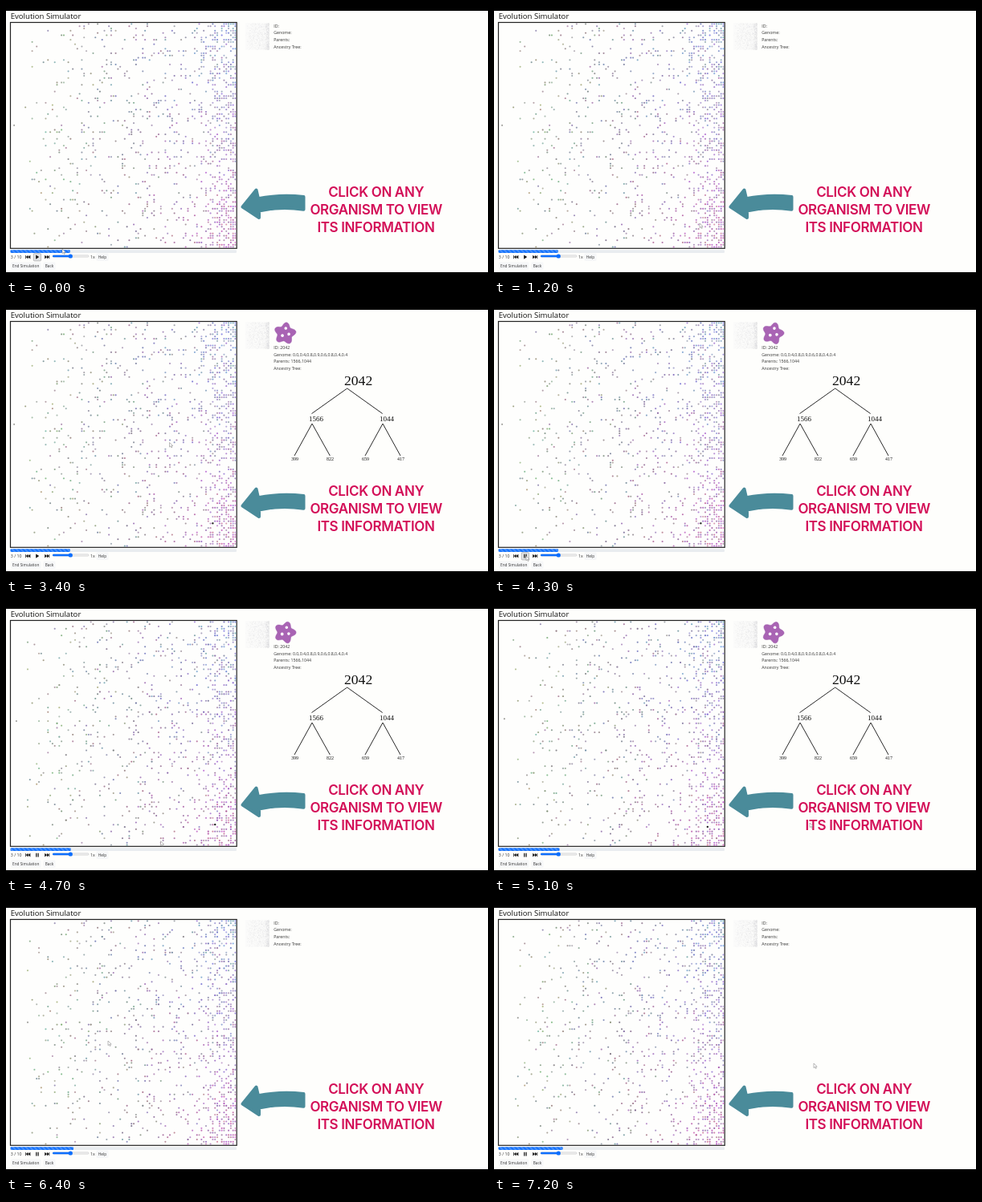
An HTML page with a canvas that plays this animation: 600x338 px, repeating every 7300 ms.

```html
<!DOCTYPE html>
<html lang="en">
<head>
<meta charset="utf-8">
<title>Evolution Simulator</title>
<style>
  html, body { margin: 0; width: 100%; height: 100%; overflow: hidden; background: #fefefc; }
  svg, canvas { position: absolute; left: 0; top: 0; width: 600px; height: 338px; }
  text { font-family: "Open Sans", "Noto Sans", sans-serif; font-size: 5.25px; fill: #333; }
  .title { font-size: 9.6px; font-weight: 500; fill: #111; }
  .btn { font-size: 4.75px; }
  .tree text { font-family: "Liberation Serif", serif; font-size: 6px; fill: #111; }
  .tree .root { font-size: 17.6px; }
  .tree .parent { font-size: 9px; }
  .call text { font-family: Inter, sans-serif; font-size: 17px; font-weight: 600; letter-spacing: -.35px; fill: #d30e57; text-anchor: middle; }
</style>
</head>
<body>
<svg viewBox="0 0 600 338">
  <defs>
    <pattern id="stripes" width="5.3" height="5.3" patternUnits="userSpaceOnUse">
      <rect width="5.3" height="5.3" fill="#0d6efd"/>
      <path d="M0 0H1.32L5.3 3.98V5.3H3.98L0 1.32ZM3.98 0H5.3V1.32ZM0 3.98V5.3H1.32Z" fill="#4a92fb"/>
    </pattern>
  </defs>
  <rect width="600" height="338" fill="#fefefc"/>
  <rect width="600" height="6" fill="#000"/>
  <rect y="332" width="600" height="6" fill="#000"/>
  <text class="title" x="5.7" y="16">Evolution Simulator</text>
  <rect x="5.5" y="20.5" width="281.7" height="281.8" fill="#fefefd" stroke="#222" stroke-width="1.2"/>

  <rect x="5.5" y="304.3" width="281.5" height="3.6" rx="1.2" fill="#e9ecef"/>
  <rect id="bar" x="5.5" y="304.3" width="74" height="3.6" rx="1" fill="url(#stripes)"/>
  <text x="5.8" y="314.9">3 / 10</text>
  <rect id="hover" x="34.3" y="308.7" width="9.2" height="9.2" rx="1" fill="#e3e4e5" stroke="#999" stroke-width=".6"/>
  <g fill="#111">
    <path d="M24.3 310.9h.7v4.4h-.7ZM27.6 310.8v4.6l-2.7-2.3ZM30.3 310.8v4.6l-2.7-2.3Z"/>
    <path id="play" d="M37.2 310.5v5.2l4-2.6Z"/>
    <path id="pause" d="M37.2 310.8h1.2v4.6h-1.2ZM39.5 310.8h1.2v4.6h-1.2Z"/>
    <path d="M48.2 310.8v4.6l2.7-2.3ZM50.9 310.8v4.6l2.7-2.3ZM53.5 310.9h.7v4.4h-.7Z"/>
  </g>
  <rect x="58" y="310.8" width="45" height="2.4" rx="1.2" fill="#efefef" stroke="#b8b8b8" stroke-width=".4"/>
  <rect x="58" y="310.8" width="22" height="2.4" rx="1.2" fill="#0d6efd"/>
  <circle cx="80.3" cy="312" r="2.6" fill="#0d6efd"/>
  <text x="105" y="314.8">1x</text>
  <g fill="#f6f7f8">
    <rect x="112.5" y="308.5" width="15" height="9.5" rx="1.3"/>
    <rect x="6" y="319.5" width="37.5" height="9.3" rx="1.3"/>
    <rect x="46.5" y="319.5" width="15" height="9.3" rx="1.3"/>
  </g>
  <text class="btn" x="114.8" y="314.9">Help</text>
  <text class="btn" x="8" y="325.8">End Simulation</text>
  <text class="btn" x="48.8" y="325.8">Back</text>

  <rect x="298" y="21" width="30" height="34" fill="#fbfbfa"/>
  <g id="labels">
    <text x="333.2" y="26.8">ID: <tspan class="val">2042</tspan></text>
    <text x="333.2" y="35.4">Genome: <tspan class="val">0.0,0.4,0.8,0.9,0.6,0.8,0.4,0.4</tspan></text>
    <text x="333.2" y="44">Parents: <tspan class="val">1566,1044</tspan></text>
    <text x="333.2" y="52.6">Ancestry Tree:</text>
  </g>
  <g id="details" class="tree">
    <g id="blob">
      <path fill="#a964b4" stroke="#9a58a8" stroke-width=".5"/>
      <g fill="#fff">
        <circle cx="2" cy="-6.3" r="1.8"/>
        <circle cx="-3.6" cy="2" r="1.9"/>
        <circle cx="4.6" cy="1.6" r="1.8"/>
      </g>
    </g>
    <path d="M380.5 135.5L424.7 104L468.7 135.5M359 188L381 148L403.3 188M447 188L469 148L491 188" fill="none" stroke="#111" stroke-width=".9"/>
    <text class="root" x="421" y="100.3">2042</text>
    <text class="parent" x="377" y="144.6">1566</text>
    <text class="parent" x="465" y="144.6">1044</text>
    <text x="355" y="194">399</text>
    <text x="399" y="194">822</text>
    <text x="443" y="194">659</text>
    <text x="487" y="194">417</text>
  </g>

  <path d="M294.5 250.500L311.500 229.500L314 240.300Q342 234.500 370.500 238V253.800Q342 249.500 315 255.500L315 264Z" fill="#4a8b9a" stroke="#4a8b9a" stroke-width="4" stroke-linejoin="round"/>
  <g class="call">
    <text x="460.7" y="237.8">CLICK ON ANY</text>
    <text x="460.7" y="259.8">ORGANISM TO VIEW</text>
    <text x="460.5" y="281.6">ITS INFORMATION</text>
  </g>
</svg>
<canvas id="field"></canvas>
<svg viewBox="0 0 600 338">
  <path id="cursor" d="M0 0V5.6L1.4 4.4L2.4 6.5L3.3 6.1L2.4 4.1H4.2Z" fill="#fff" stroke="#777" stroke-width=".5"/>
</svg>
<script>
const LOOP = 7300, PICK = 1300, START = 4200, CLEAR = 6100;
const CELLS = 100, SIZE = 2.81;
const $ = id => document.getElementById(id);
const show = (el, on) => { el.style.display = on ? "" : "none"; };
const mix = (a, b, k) => a + (b - a) * k;
const clamp = (v, lo, hi) => Math.min(hi, Math.max(lo, v));
const smooth = k => k * k * (3 - 2 * k);

let seed = 2042;
function rnd() {
  seed = (seed + 0x6D2B79F5) | 0;
  let h = Math.imul(seed ^ (seed >>> 15), 1 | seed);
  h = (h + Math.imul(h ^ (h >>> 7), 61 | h)) ^ h;
  return ((h ^ (h >>> 14)) >>> 0) / 4294967296;
}

// Chance that a cell is occupied; v runs from top to bottom
function density(u, v) {
  if (u < .06) return 0;
  if (u < .15) return mix(.01, .055, (u - .06) / .09);
  if (u < .78) return mix(.055, .075, (u - .15) / .63);
  const edge = .3 + .25 * Math.abs(2 * v - 1);
  return .075 + edge * Math.pow((u - .78) / .22, 1.5);
}

// Green on the left, blue at top right, pink at bottom right
function tint(u, v) {
  const right = [mix(122, 186, v), mix(142, 98, v), mix(200, 176, v)];
  const left = [144, 164, 132], mid = [130, 122, 146];
  const rgb = right.map((c, i) => {
    const base = u < .5 ? mix(left[i], mid[i], u * 2) : mix(mid[i], c, u * 2 - 1);
    return Math.round(base + (rnd() - .5) * 64);
  });
  return `rgba(${rgb},.8)`;
}

const dots = [{ x: 1, y: 45, amp: .8, drift: 2.6, p: 1, q: 2, w: 3, color: "#a0a09c" }];
for (let y = 0; y < CELLS; y++) {
  for (let x = 0; x < CELLS; x++) {
    const u = x / (CELLS - 1), v = y / (CELLS - 1);
    if (rnd() > density(u, v)) continue;
    dots.push({
      x, y, color: tint(u, v),
      amp: u > .85 ? .7 : 1.5,
      drift: u > .85 ? 0 : (rnd() - .35) * .9,
      p: rnd() * 6.28, q: rnd() * 6.28, w: 2 + rnd() * 3
    });
  }
}

const ratio = Math.max(2, window.devicePixelRatio || 1);
const canvas = $("field");
canvas.width = 600 * ratio;
canvas.height = 338 * ratio;
const ctx = canvas.getContext("2d");

function disc(x, y, r, color) {
  ctx.fillStyle = color;
  ctx.beginPath();
  ctx.arc(x, y, r, 0, 7);
  ctx.fill();
}

function place(d, s) {
  const sway = ph => d.amp * (Math.sin(ph + d.w * s) - Math.sin(ph));
  return [
    clamp(Math.round(d.x + sway(d.p) + d.drift * s), 0, CELLS - 1),
    clamp(Math.round(d.y + sway(d.q)), 0, CELLS - 1)
  ];
}

function drawField(s, picked) {
  ctx.setTransform(ratio, 0, 0, ratio, 0, 0);
  ctx.clearRect(0, 0, 600, 338);
  for (const d of dots) {
    const [x, y] = place(d, s);
    disc(7.3 + x * SIZE, 22.4 + y * SIZE, 1.05, d.color);
    ctx.fillStyle = "rgba(120,120,135,.15)";
    ctx.fillRect(297.5 + x * .3, 21.5 + y * .33, .5, .5);
  }
  if (picked) {
    const k = s / 1.6;
    disc(257.4 + Math.round(4.6 * k) * SIZE, 272.3 + Math.round(4.2 * k) * SIZE, 1.2, "#222");
  }
}

// Pointer stops: time, x, y
const stops = [
  [0, 70, 303], [300, 70, 303], [1150, 256, 271], [1450, 256, 271], [2100, 367, 30],
  [2900, 367, 30], [3900, 40, 313], [4450, 40, 313], [5000, 393, 273], [5200, 393, 273],
  [5750, 123, 173], [6000, 127, 172], [6450, 127, 172], [7150, 398, 200], [LOOP, 398, 200]
];
function pointer(t) {
  const i = Math.max(1, stops.findIndex(p => p[0] > t));
  const [a, b] = [stops[i - 1], stops[i]];
  const k = smooth((t - a[0]) / (b[0] - a[0]));
  return [mix(a[1], b[1], k), mix(a[2], b[2], k)];
}

let outline = "";
for (let i = 0; i < 60; i++) {
  const a = i * Math.PI / 30, r = 11.6 + 2.2 * Math.cos(5 * a);
  outline += (i ? "L" : "M") + (r * Math.cos(a)).toFixed(2) + " " + (r * Math.sin(a)).toFixed(2);
}
$("blob").firstElementChild.setAttribute("d", outline + "Z");
const values = document.querySelectorAll(".val");

function render(t) {
  const s = Math.max(0, t - START) / 1000;
  const picked = t >= PICK && t < CLEAR;
  drawField(s, picked);
  show($("details"), picked);
  values.forEach(v => show(v, picked));
  $("labels").setAttribute("transform", `translate(0 ${picked ? 28.2 : 0})`);
  $("blob").setAttribute("transform", `translate(347.3 35.5) rotate(${(t - 5800) * .0072 + 8})`);
  $("bar").setAttribute("width", 74.3 + s * 1.95);
  $("stripes").setAttribute("patternTransform", `translate(${s * 5.3} 0)`);
  show($("play"), s === 0);
  show($("pause"), s > 0);
  show($("hover"), t < 300 || (t > 3800 && t < 4600));
  $("cursor").setAttribute("transform", `translate(${pointer(t)})`);
}

const begin = performance.now();
function tick() {
  const t = (performance.now() - begin) % LOOP;
  render(Math.floor(t / 100) * 100);
  requestAnimationFrame(tick);
}
tick();
</script>
</body>
</html>
```
